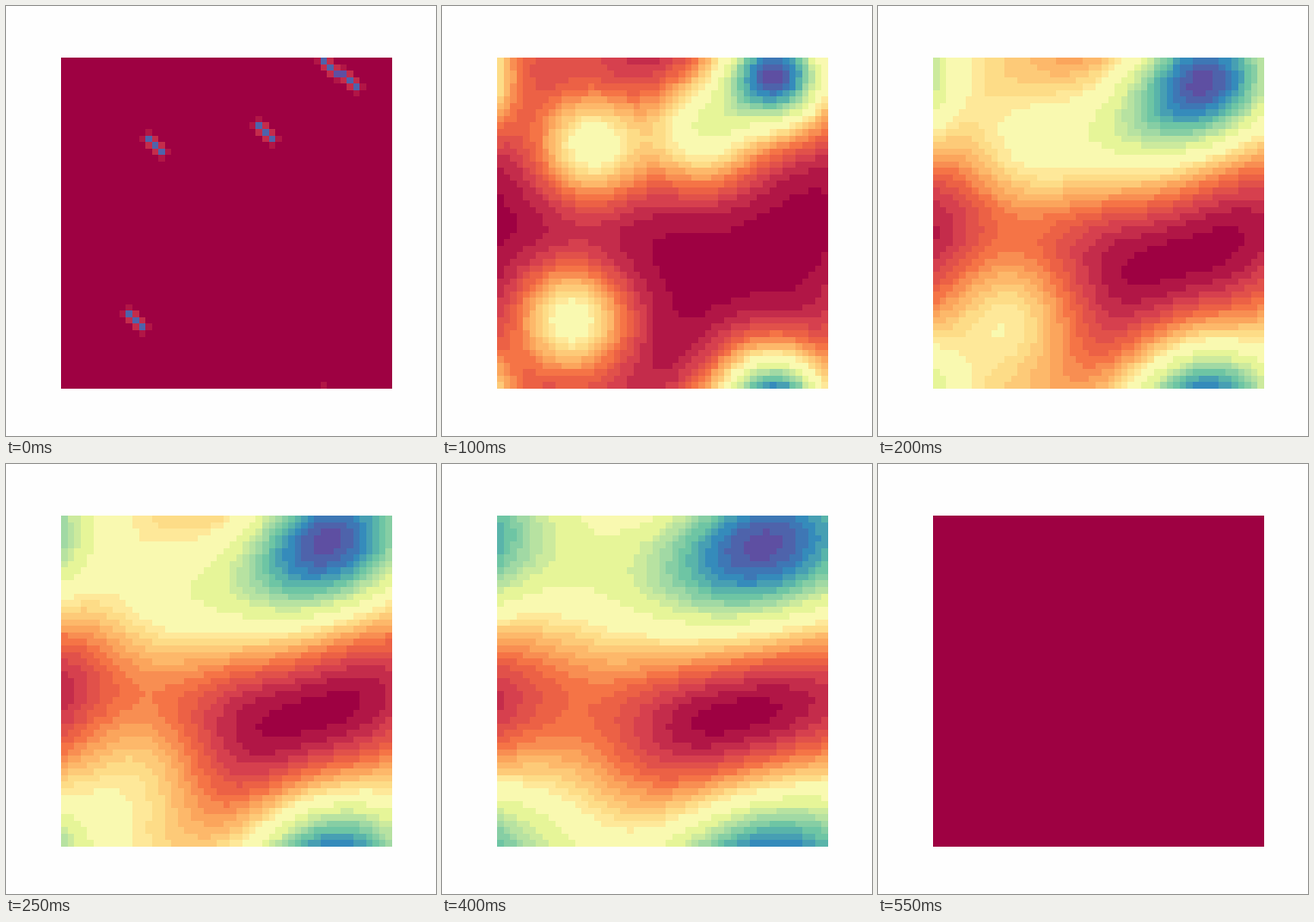
These frames come from a looping animation (500x500 px, 2550 ms). A matplotlib script:

```python
import numpy as np
import matplotlib.pyplot as plt
from matplotlib.animation import FuncAnimation
from matplotlib.colors import ListedColormap, to_rgba

SIZE = 51          # periodic grid, cells per side
RATE = 0.035       # diffusion per step
STEPS = 260        # steps between two pictures
PICTURES = 11
FRAMES = 51        # 50 ms each, the rest of the loop stays flat
LEVELS = 28

# Middle cell (row, column) of each three-cell diagonal seed
SEEDS = [(13, 14), (11, 31), (40, 11), (1, 41), (3, 44)]


def seed_field():
    u = np.zeros((SIZE, SIZE))
    for row, col in SEEDS:
        for d in (-1, 0, 1):
            u[(row + d) % SIZE, (col + d) % SIZE] = 1
    return u


def diffuse(u):
    around = sum(np.roll(u, shift, axis) for shift in (-1, 1) for axis in (0, 1))
    return u + RATE * (around - 4 * u)


def banded(u):
    """Scale to the field's own range and round to colour levels."""
    return np.round((u - u.min()) / np.ptp(u) * LEVELS)


def make_pictures():
    u = diffuse(seed_field())
    pictures = [banded(u)]
    while len(pictures) < PICTURES:
        for _ in range(STEPS):
            u = diffuse(u)
        pictures.append(banded(u))
    return pictures


def make_cmap():
    spectral = plt.get_cmap("Spectral")
    colors = spectral(np.linspace(0, 1, LEVELS + 1))
    colors[13:16] = to_rgba("#f9f9b0")   # wide pale band in the middle
    colors[16:18] = spectral(0.6)
    return ListedColormap(colors)


pictures = make_pictures()
flat = np.zeros((SIZE, SIZE))

fig, ax = plt.subplots(figsize=(5, 5), dpi=100, facecolor="#fefefe")
ax.axis("off")
image = ax.imshow(pictures[0], cmap=make_cmap(), interpolation="nearest",
                  vmin=-0.5, vmax=LEVELS + 0.5)


def update(i):
    image.set_data(pictures[i] if i < PICTURES else flat)
    return [image]


anim = FuncAnimation(fig, update, frames=FRAMES, interval=50, repeat=True,
                     repeat_delay=0)
plt.show()
```
